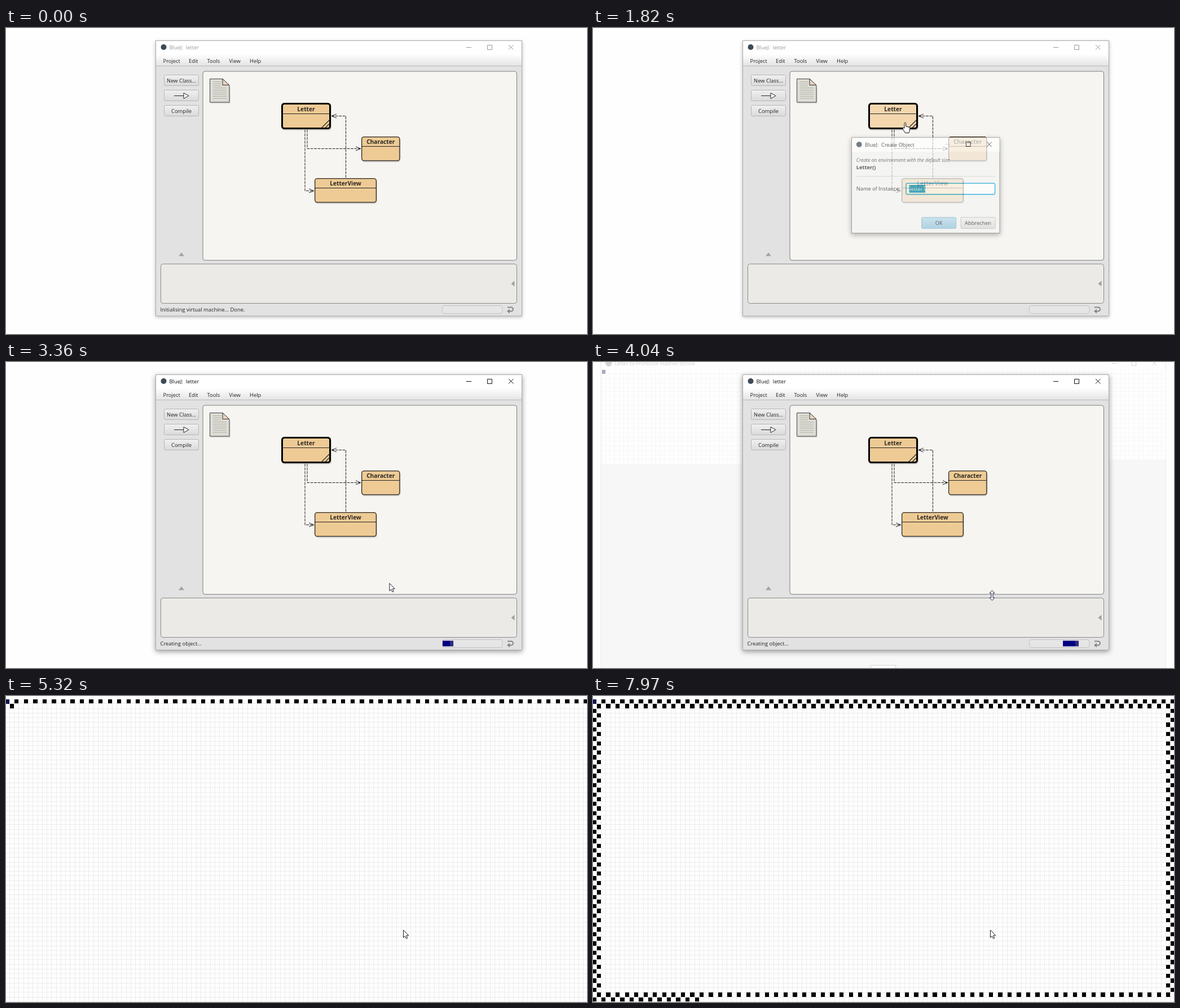
These frames come from a looping animation (1030x544 px, 8 s). An HTML page:

```html
<!DOCTYPE html>
<html lang="en">
<head>
<meta charset="utf-8">
<title>Creating an object</title>
<style>
html, body { margin: 0; width: 100%; height: 100%; overflow: hidden; background: #fefefe; }
svg { display: block; width: 1030px; height: 544px; }
text { font: 9.4px "Open Sans", "Noto Sans", sans-serif; fill: #222; white-space: pre; }
.bold { font-weight: 700; }
.cls { font-size: 10.2px; font-weight: 700; fill: #2b2620; }
.crisp { shape-rendering: crispEdges; }
</style>
</head>
<body>
<svg id="stage" viewBox="0 0 1030 544" xmlns="http://www.w3.org/2000/svg"></svg>
<script>
const LOOP = 8000;
const $ = id => document.getElementById(id);

// Markup helpers
const rect = (x, y, w, h, fill, extra = '') =>
  `<rect x="${x}" y="${y}" width="${w}" height="${h}" fill="${fill}" ${extra}/>`;
const line = (d, stroke = '#222', extra = '') =>
  `<path d="${d}" fill="none" stroke="${stroke}" ${extra}/>`;
const label = (x, y, s, extra = '') => `<text x="${x}" y="${y}" ${extra}>${s}</text>`;
const centred = (x, y, s, cls = '') => label(x, y, s, `text-anchor="middle" class="${cls}"`);
const gradient = (id, a, b) => `<linearGradient id="${id}" x2="0" y2="1">
  <stop stop-color="${a}"/><stop offset="1" stop-color="${b}"/></linearGradient>`;
const button = (x, y, w, h, s, fill = 'url(#btn)', edge = '#b6b6b6') =>
  rect(x + .5, y + .5, w - 1, h - 1, fill, `rx="2" stroke="${edge}"`) +
  centred(x + w / 2, y + h / 2 + 3.5, s);
const minimise = (x, y) => `M${x - 4} ${y + .5}h9`;
const maximise = (x, y) => `M${x - 3.5} ${y - 3.5}h8v8h-8z`;
const cross = (x, y) => `M${x - 4} ${y - 4}l8.5 8.5m0-8.5l-8.5 8.5`;

const classBox = (x, y, w, h, name, thick, id) => `
  ${rect(x + 1, y + 2, w, h, '#000', 'rx="5" opacity=".16"')}
  ${rect(x + thick / 2, y + thick / 2, w - thick, h - thick, '#eecb95',
    `id="${id}" rx="4" stroke="${thick > 2 ? '#000' : '#2b2620'}" stroke-width="${thick}"`)}
  ${line(`M${x + 1} ${y + (thick > 2 ? 19.5 : 17.5)}h${w - 2}`)}
  ${centred(x + w / 2, y + (thick > 2 ? 15 : 13), name, 'cls')}`;

const mainWindow = () => `
  ${rect(265, 22, 650, 490, '#e2e2e2', 'id="mainBase"')}
  ${rect(266, 23, 648, 23, '#fff')}
  ${rect(266, 46, 648, 21, 'url(#menubar)')}
  ${line('M266 67.5h648', '#b9b9b9')}
  <circle cx="279.5" cy="34" r="5" fill="#3c4a56"/>
  <g id="mainTitle">${label(289.5, 38, 'BlueJ:  letter', 'style="fill:inherit"')}
    ${line(minimise(820, 34) + maximise(857, 34) + cross(895, 34), 'currentColor')}</g>
  ${[[278.5, 'Project'], [324, 'Edit'], [356.5, 'Tools'], [395.5, 'View'], [432, 'Help']]
    .map(([x, s]) => label(x, 61.5, s)).join('')}
  ${button(280, 83, 62, 20, 'New Class...')}
  ${button(280, 110, 62, 20, '')}
  ${button(280, 137, 62, 20, 'Compile')}
  <path d="M298 120.5h17v-5l9 5l-9 5v-5" fill="#fff" stroke="#222"/>
  <path d="M306 405.5l5-6.5l5 6.5z" fill="#a3a3a3"/>
  ${rect(349, 77, 556.5, 336, '#f6f5f1', 'rx="4" stroke="#7d7d7d"')}
  ${rect(274.5, 419.5, 631, 70, '#ebeae6', 'rx="4" stroke="#8a8a8a"')}
  <path d="M901.5 449.5v10l-6-5z" fill="#a0a0a0"/>
  <path d="M361.5 90.5h22l13 13v28.500h-35z" fill="#000" opacity=".14" transform="translate(1 2)"/>
  <path d="M361.500 90.500h22.500l12 12v29.500h-34.500z" fill="#dddcd5" stroke="#444"/>
  <path d="M384 90.500v11h12z" fill="#ead2c0" stroke="#333"/>
  ${line(Array.from({ length: 9 }, (_, i) => `M367 ${95.5 + i * 3.7}H${i < 3 ? 381 : 391}`).join(''), '#b2b2aa')}
  ${line('M530 181V289.500H545M534 181V214.500H628M602.500 266V156.500H578', '#222', 'stroke-dasharray="5 1.500"')}
  ${line('M537 286l9 3.500l-9 3.500M620 211l9 3.500l-9 3.500M586 153l-9 3.500l9 3.500')}
  ${classBox(488, 133, 88, 47, 'Letter', 3, 'letterBox')}
  ${line('M559.500 177.500L574 163M566 177.500L574 169.500', '#222', 'stroke-width="1.200"')}
  ${classBox(630, 193, 68.5, 43.5, 'Character', 1.3, 'charBox')}
  ${classBox(547, 267, 110, 43.5, 'LetterView', 1.3, 'viewBox1')}
  <text id="status" x="273.500" y="504"></text>
  ${rect(773.5, 493.5, 106.5, 14, '#e6e6e6', 'rx="4" stroke="#c2c2c2"')}
  <g clip-path="url(#barClip)">${rect(0, 495.500, 28, 10, 'url(#bar)', 'id="progress"')}</g>
  ${line('M889 496.500h6.500a3.500 3.500 0 0 1 0 7h-4', '#858585', 'stroke-width="2"')}
  <path d="M893 499.500v8l-5-4z" fill="#858585"/>
  ${rect(265.500, 22.500, 649, 489.500, 'none', 'stroke="#aaa"')}`;

const contextMenu = () => `
  ${rect(548.500, 163.500, 130, 174, '#f4f4f4', 'stroke="#c4c4c4" style="filter:drop-shadow(1px 2px 3px #0005)"')}
  ${rect(549, 166, 129, 19, '#0096c9', 'id="menuHover"')}
  ${[['new Letter()', 179], ['new Letter(int, int)', 198], ['Open Editor', 224], ['Compile', 244],
     ['Inspect', 264], ['Remove', 284], ['Create Test Class', 312]]
    .map(([s, y], i) => label(559, y, s, i ? '' : 'id="menuFirst"')).join('')}
  ${line('M549 207.500h129M549 294.500h129', '#cfcfcf')}`;

const dialog = () => `
  ${rect(456.500, 193.500, 266.500, 172.500, '#f4f4f3', 'stroke="#777" style="filter:drop-shadow(0 3px 5px #0006)"')}
  ${rect(457, 194, 265.500, 25, '#fff')}
  <circle cx="470" cy="206" r="5" fill="#3c4a56"/>
  ${label(480.500, 209.500, 'BlueJ:  Create Object')}
  ${line(minimise(629, 205), '#ccc')}
  ${line(maximise(666, 205) + cross(704, 205.500), '#111')}
  ${label(465, 237.500, 'Create an environment with the default size.', 'style="font-style:italic;font-size:8.800px;fill:#444"')}
  ${label(465, 251, 'Letter()', 'class="bold"')}
  ${line('M465 263.500h250', '#ccc')}
  ${label(465, 289.500, 'Name of Instance:')}
  ${rect(554.500, 276, 160, 20, '#fff', 'rx="2.500" stroke="#2aaede" stroke-width="1.800"')}
  ${rect(560, 279, 29, 14, '#0096c9')}
  ${label(561, 289.500, 'letter1', 'style="fill:#fff"')}
  ${button(582, 337, 63, 21, 'OK', 'url(#okBtn)', '#7fb0c8')}
  ${button(652.500, 337, 63, 21, 'Abbrechen')}`;

// Checkered border on a fine grid
const PITCH = 8.272, COLS = 125, ROWS = 66;
const cellX = c => Math.floor(-1.9 + PITCH * c);
const cellY = r => Math.floor(5.6 + PITCH * r);
const gridPath = () => {
  let d = '';
  for (let c = 0; c < COLS; c++) d += `M${cellX(c) + .5} 6V560`;
  for (let r = 1; r < ROWS; r++) d += `M-3 ${cellY(r) + .5}H1033`;
  return d;
};
const square = (c, r) => {
  const x = cellX(c) + 1, y = cellY(r) + 1;
  return `M${x} ${y}H${cellX(c + 1)}V${cellY(r + 1)}H${x}z`;
};
const squares = [];
for (let i = 0; i < 124; i++) {
  const r = i < 62 ? 0 : 1, c = 2 * (i % 62) + (r ? 1 : 2);
  squares.push({ at: 4840 + i * 7.7, d: square(c, r) });
}
for (let r = 2; r < 63; r++) {
  const at = 6560 + (r - 34.3) * 23.4, odd = r % 2;
  squares.push({ at, d: square(odd, r) + square(124 - odd, r) });
}
for (let i = 0; i < 125; i++) {
  const r = i < 62 ? 63 : 64, c = i < 62 ? 2 * i + 1 : 2 * (i - 62);
  squares.push({ at: 7970 + (i - 73.4) / .0985, d: square(c, r) });
}

const canvasWindow = () => `
  ${rect(-2.500, -18, 1034.500, 600, '#ededed', 'stroke="#bbb"')}
  ${rect(-2, -17.500, 1033.500, 23.500, '#fefefe')}
  <circle cx="11.500" cy="-6" r="6" fill="#888"/>
  ${label(22, -2.500, 'Letter to Professor Halmer-Strook', 'style="fill:#888"')}
  ${line(minimise(937, -6) + maximise(973, -6) + cross(1011, -6), '#888')}
  <g id="gridArea"><path d="M-2 6H1032V600H-2z" fill="#fefefe"/>
    <path class="crisp" d="${gridPath()}" stroke="#ececec"/></g>
  ${rect(491.500, 549, 46, 22, '#fff', 'stroke="#888"')}
  ${rect(-1, 6, 7, 8, '#10104f', 'class="crisp"')}
  <path id="checks" class="crisp" fill="#000"/>`;

const cursors = () => `
  <path id="arrow" d="M.500 .500v13.500l3-2.800l2 4.600l2.300-1l-2-4.500h4z" fill="#fff" stroke="#1b1b2b"/>
  <path id="hand" d="M-1 10V1.500a1.300 1.300 0 0 1 2.700 0V7l5.500 1.200q1.800 .5 1.600 2.500l-.8 4.500l-1 3.300h-6.500l-4-6.500q-1.500-2.500 .5-2.700z" fill="#fff" stroke="#111"/>
  <path id="resize" d="M0-9l4.500 5h-3v8h3l-4.500 5l-4.500-5h3v-8h-3z" fill="#fff" stroke="#1c2340"/>
  <circle id="busy" r="6.400" fill="none" stroke="#46a5ee" stroke-width="4"/>`;

$('stage').innerHTML = `<defs>
  ${gradient('btn', '#f0f0f0', '#dadada')}${gradient('okBtn', '#b7dbea', '#92c5dc')}
  ${gradient('menubar', '#fff', '#e4e4e4')}
  <linearGradient id="bar"><stop stop-color="#000080"/><stop offset=".78" stop-color="#000080"/>
    <stop offset=".8" stop-color="#2c2c80"/><stop offset="1" stop-color="#2c2c80"/></linearGradient>
  <clipPath id="barClip"><rect x="774" y="494" width="105.500" height="13"/></clipPath>
  <clipPath id="partial"><path d="M-3 6H1033V171H780Q800 176 835 179H-3z"/></clipPath>
  </defs>
  ${rect(0, 0, 1030, 544, '#fefefe')}
  <g id="canvasWin">${canvasWindow()}</g>
  <g id="mainWin">${mainWindow()}</g>
  <g id="menu">${contextMenu()}</g>
  <g id="dialog">${dialog()}</g>
  <g id="cursor">${cursors()}</g>`;

const clamp = v => Math.max(0, Math.min(1, v));
const easeOut = u => 1 - (1 - u) ** 2;
const show = (id, on) => $(id).setAttribute('visibility', on ? 'visible' : 'hidden');

// Windows fade in while growing from 95 % of their size
function reveal(id, p, cx, cy) {
  const s = .95 + .05 * p;
  $(id).setAttribute('opacity', p);
  $(id).setAttribute('transform', `translate(${cx} ${cy}) scale(${s}) translate(${-cx} ${-cy})`);
}

const pointerPath = [
  [70, 604, 400], [680, 548, 163], [1140, 548, 163], [1290, 553, 168], [2100, 553, 168],
  [2310, 595, 314], [2520, 595, 314], [2700, 606.5, 335.5], [3100, 606.5, 335.5], [3500, 707.5, 415]
];
function pointerAt(t) {
  const i = pointerPath.findIndex(k => k[0] > t);
  if (i < 0) return pointerPath.at(-1).slice(1);
  if (!i) return pointerPath[0].slice(1);
  const [t0, x0, y0] = pointerPath[i - 1], [t1, x1, y1] = pointerPath[i];
  const u = (t - t0) / (t1 - t0), e = u * u * (3 - 2 * u);
  return [x0 + (x1 - x0) * e, y0 + (y1 - y0) * e];
}

let drawn = -1;
function render(t) {
  const front = t >= 4310, menuOpen = t >= 940 && t < 1680;
  const active = t >= 70 && t < 1680 || t >= 3030;

  show('mainWin', !front);
  $('mainTitle').setAttribute('fill', active ? '#111' : '#999');
  $('mainTitle').setAttribute('color', active ? '#111' : '#999');
  $('mainBase').style.filter = active
    ? 'drop-shadow(0 3px 5px #0006)' : 'drop-shadow(0 2px 3px #0004)';
  $('status').textContent = t < 1680 ? 'Initialising virtual machine... Done.'
    : t >= 3030 ? 'Creating object...' : '';
  $('progress').setAttribute('x', 774 + (t < 3170 ? -40 : -28 + (t - 3170) / 10));

  const [x, y] = pointerAt(t);
  const onLetter = !menuOpen && t < 3000 && x > 488 && x < 576 && y > 133 && y < 180;
  $('letterBox').setAttribute('fill', onLetter ? '#f4d7ae' : '#eecb95');

  show('menu', menuOpen);
  const hovered = menuOpen && t >= 1140;
  show('menuHover', hovered);
  $('menuFirst').style.fill = hovered ? '#fff' : '#222';

  const opening = easeOut(clamp((t - 1694) / 280)), closing = clamp((t - 2960) / 200);
  reveal('dialog', opening * (1 - closing), 589.5, 279.5);
  reveal('canvasWin', easeOut(clamp((t - 3986) / 280)) || 0, 515, 245);
  if (front) reveal('canvasWin', 1, 515, 245);
  $('gridArea').setAttribute('clip-path', t < 4840 ? 'url(#partial)' : 'none');

  const ready = squares.filter(s => s.at <= t);
  if (ready.length !== drawn) {
    drawn = ready.length;
    $('checks').setAttribute('d', ready.map(s => s.d).join(''));
  }

  const kind = t < 70 ? '' : front ? (t < 5120 ? 'busy' : 'arrow')
    : onLetter ? 'hand' : t >= 3480 ? 'resize' : 'arrow';
  for (const id of ['arrow', 'hand', 'resize', 'busy']) show(id, id === kind);
  const [px, py] = front && kind === 'arrow' ? [704, 415.5] : [x, y];
  $('cursor').setAttribute('transform', `translate(${px} ${py})`);
}

const start = performance.now();
function tick() {
  render((performance.now() - start) % LOOP);
  requestAnimationFrame(tick);
}
render(0);
requestAnimationFrame(tick);
</script>
</body>
</html>
```
